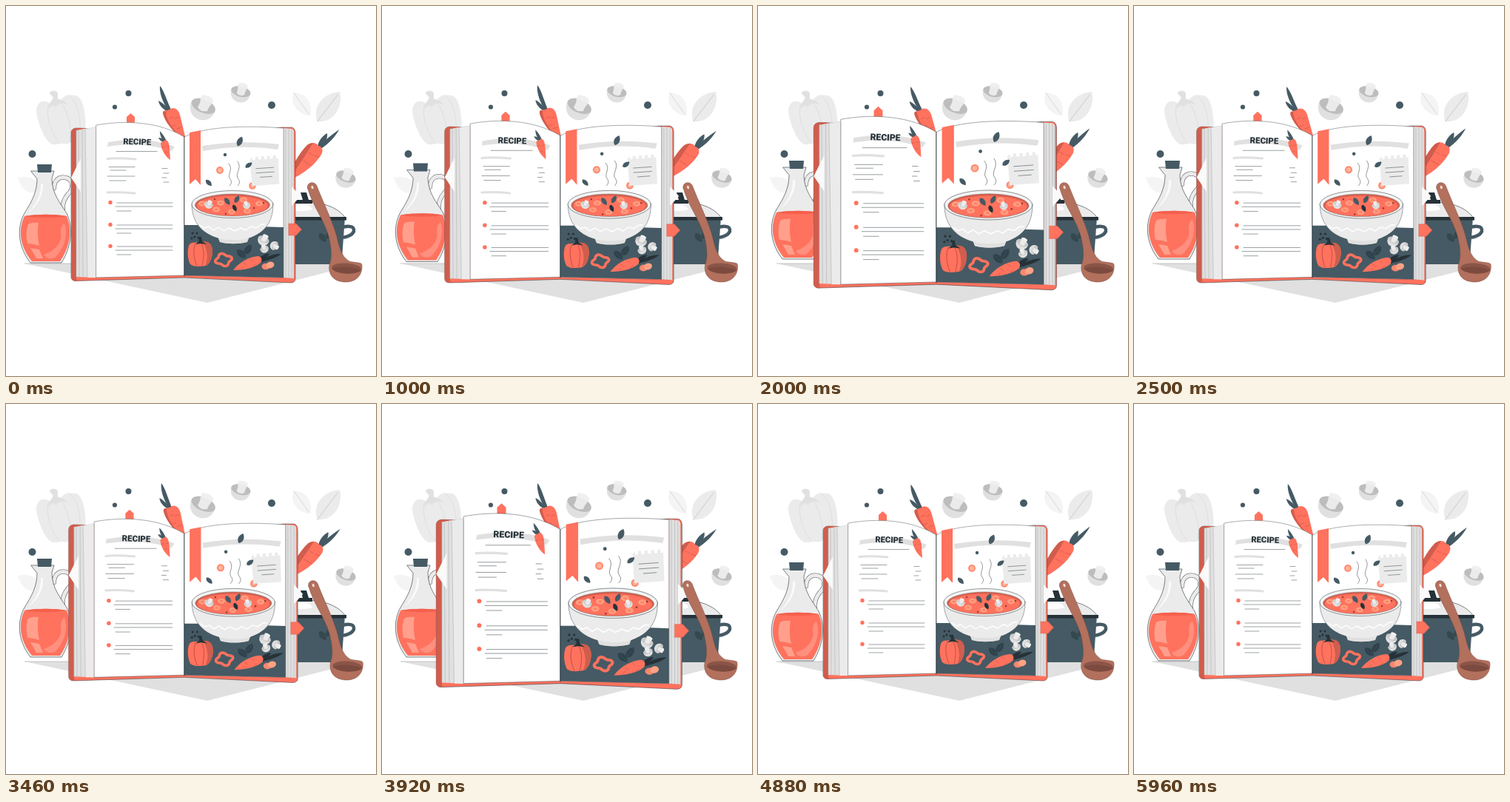
An HTML page with a canvas that plays this animation: 500 by 500 pixels, repeating every 6 s.

```html
<!DOCTYPE html>
<html lang="en">
<head>
<meta charset="utf-8">
<title>Recipe book</title>
<style>
html, body { margin: 0; width: 100%; height: 100%; overflow: hidden; background: #fff; }
canvas { display: block; width: 100vw; height: 100vh; }
</style>
</head>
<body>
<canvas id="stage"></canvas>
<script>
const LOOP = 6000, TAU = Math.PI * 2;
const CORAL = '#ff725e', RUST = '#d05d4d', PEACH = '#ff9f8c', SLATE = '#455a64', INK = '#263238';
const G1 = '#f4f4f4', G2 = '#ebebeb', G3 = '#e0e0e0', G4 = '#bdbdbd';
const canvas = document.getElementById('stage');
const ctx = canvas.getContext('2d');

// [time, value] pairs, eased by a half cosine between neighbours
const SCALE = [[0, 1], [700, 1], [1690, 1.099], [2860, 1], [3220, 1], [4010, 1.099], [4730, 1], [6000, 1]];
const SWAY = [[0, 0], [600, 0], [1500, -1], [2500, 1.3], [3460, 1.3], [3960, -1], [4800, 0], [6000, 0]];
const LIFT = [[0, 0], [500, 0], [1900, -5], [3900, -5], [4800, 0], [6000, 0]];

function ease(keys, t) {
  let i = 1;
  while (i < keys.length - 1 && t > keys[i][0]) i++;
  const [t0, a] = keys[i - 1], [t1, b] = keys[i];
  return a + (b - a) * (1 - Math.cos(Math.PI * (t - t0) / (t1 - t0))) / 2;
}

const cache = {};
const path = d => cache[d] || (cache[d] = new Path2D(d));

function shape(d, fill, stroke, w = 0.5) {
  const p = path(d);
  if (fill) { ctx.fillStyle = fill; ctx.fill(p); }
  if (stroke) { ctx.strokeStyle = stroke; ctx.lineWidth = w; ctx.stroke(p); }
}
const line = (d, color = INK, w = 0.45) => shape(d, null, color, w);

function oval(x, y, rx, ry, fill, rot = 0, stroke) {
  ctx.beginPath();
  ctx.ellipse(x, y, rx, ry, rot, 0, TAU);
  if (fill) { ctx.fillStyle = fill; ctx.fill(); }
  if (stroke) { ctx.strokeStyle = stroke; ctx.lineWidth = 0.5; ctx.stroke(); }
}
const dot = (x, y, r, fill) => oval(x, y, r, r, fill);

function place(x, y, rot, s, draw) {
  ctx.save();
  ctx.translate(x, y);
  ctx.rotate(rot);
  ctx.scale(s, s);
  draw();
  ctx.restore();
}

function pivot(x, y, rot, draw) {
  place(x, y, rot, 1, () => { ctx.translate(-x, -y); draw(); });
}

// a pointed leaf of length 20 along x, centred
function leaf(x, y, rot, s, fill, vein) {
  place(x, y, rot, s, () => {
    shape('M-10 0C-6 -7 4 -7 10 0C4 7 -6 7 -10 0Z', fill);
    if (vein) line('M-10 0L8 0', vein, 0.6);
  });
}

// dome below, dark gills facing up, stem rising from them
function mushroom(x, y, rot, s, dark = G4) {
  place(x, y, rot, s, () => {
    shape('M-18 -3C-19 10 -10 18 0 18C11 18 19 10 18 -3Z', G3);
    oval(0, -2, 18, 9.5, dark);
    shape('M-7 2C-5 -4 -8 -9 -8 -14C-6 -19 8 -19 10 -14C10 -9 7 -4 8 2C4 6 -4 6 -7 2Z', G2);
    oval(1, -14, 9, 3.6, '#f0f0f0');
  });
}

function floor() {
  shape('M25 348L272 401L480 348Z', G3);
  line('M25 348H480', '#999', 0.5);
}

function greyPepper() {
  shape('M62 129C52 121 42 128 43 143C44 158 49 178 57 184C63 188 68 184 72 186C79 189 84 184 88 186C98 188 106 176 107 160C109 139 106 122 94 123C88 120 82 123 78 127C73 122 67 123 62 129Z', G2);
  line('M61 130C54 146 59 170 68 185M76 128C86 143 88 169 82 185M92 125C102 139 102 164 94 184', '#dedede', 0.9);
  shape('M60 138C61 129 67 128 68 122L64 116C67 112 73 113 75 117L74 126C80 127 84 130 86 135C79 130 74 131 70 136C68 131 64 132 60 138Z', G3);
}

function bottle() {
  line('M65 246C65 235 72 230 81 232C92 235 91 248 84 254C79 260 76 266 77 274', '#555', 6);
  line('M65 246C65 235 72 230 81 232C92 235 91 248 84 254C79 260 76 266 77 274', G2, 5);
  shape('M34 223H65L62 233C62 253 73 266 82 280C90 297 90 323 75 347H33C15 324 15 298 25 280C35 264 42 251 42 234Z', G2, INK, 0.6);
  shape('M25 284C17 301 17 323 35 345H73C88 323 89 301 82 284C65 281 43 281 25 284Z', CORAL);
  shape('M25 284C43 281 65 281 82 284C65 287 43 287 25 284Z', '#f4604d');
  shape('M30 295C35 292 41 293 44 293C42 304 43 314 45 324C39 322 33 321 29 321C27 311 27 303 30 295Z', PEACH);
  shape('M33 327L45 329L50 341L41 341Z', PEACH);
  shape('M79 294C84 306 80 327 66 340C59 343 53 340 51 336C66 331 77 319 74 306C74 299 76 295 79 294Z', '#ff8f7e');
  shape('M47 240C48 258 37 271 31 279C44 268 51 255 50 240Z', '#fafafa');
  shape('M42 214H62L61 225H43Z', SLATE);
}

function leftCarrot() {
  shape('M220 142C212 131 207 118 208 108C213 113 217 127 223 140Z', SLATE);
  shape('M219 143C211 139 207 134 206 128C211 130 217 136 222 142Z', SLATE);
  shape('M212 145C213 140 219 142 222 139C228 136 233 140 235 147L244 184C231 175 216 160 212 145Z', CORAL);
  shape('M212 145C212 142 214 141 216 142C216 154 226 169 244 184C231 175 216 160 212 145Z', RUST);
  line('M221 152L226 150M223 163L229 161M233 150L228 152M237 164L231 166', RUST, 0.8);
}

function rightCarrot() {
  shape('M421 192C421 183 428 175 434 172C435 179 431 187 424 193Z', SLATE);
  shape('M421 192C430 182 440 174 450 167C446 175 437 186 424 194Z', SLATE);
  shape('M407 188C413 183 420 185 422 189C428 190 429 196 426 201C417 215 404 226 380 237C386 217 396 199 407 188Z', CORAL);
  shape('M407 188C410 186 413 185 415 185C407 198 393 220 380 237C386 217 396 199 407 188Z', RUST);
  line('M409 198L414 201M402 209L407 212M423 204L417 202M412 215L407 212', RUST, 0.8);
}

function pot() {
  line('M451 301C457 297 469 296 470 302C471 308 462 313 451 313', SLATE, 4.5);
  shape('M340 286H458L454 341C453 347 449 349 444 349H340Z', SLATE);
  leaf(428, 313, 0.9, 0.75, '#344850');
  leaf(437, 308, -1, 0.75, '#344850');
  shape('M340 286C350 267 384 263 411 265C437 267 452 276 459 287Z', G2, INK, 0.6);
  shape('M391 270C404 266 412 269 414 275C406 278 396 277 390 277Z', '#fff');
  shape('M340 285H460V289.500H340Z', INK);
  shape('M398 252H406L409 262H414V267H391V262H401Z', INK);
}

function ladle() {
  shape('M407.500 246C406 238 417 236 420 243C428 264 440 288 446 308C450 323 452 338 464 345C471 347 481 346 481 350C482 365 472 373 459 373C444 373 435 364 437 350C441 340 440 327 436 311C430 289 414 270 407.500 246Z', '#b2705d', '#7b493e', 0.5);
  oval(460, 354.500, 20, 7, '#8a5548', 0.06);
  shape('M440 355C452 350 470 353 480 357C474 363 449 364 440 355Z', '#7d4a3f');
  oval(414, 245, 1.5, 2.4, '#f5dfd6', -0.3);
}

function cover() {
  shape('M163 162V150L168.500 145L174 150V162Z', CORAL);
  shape('M88 172C88 167 91 165 96 165L122 166L241 180L372 164H385C389 164 391 167 391 172V368C391 372 389 374 384 374L241 367L96 371.500C91 372 88 370 88 366Z', CORAL, INK, 0.5);
  shape('M88 172C88 167 91 165 96 165H106L95 170V368L96 371.500C91 372 88 370 88 366Z', RUST);
}

function pageEdges() {
  shape('M95 168L122 163V367L95 366Z', G3);
  shape('M107 167L122 164V367L110 367Z', G2);
  line('M95 168V366M98 168L99 366M103 167L104 366M107 167L110 367', '#b4b4b4', 0.6);
  shape('M375 165L386 166C389 167 389 169 389 172V368L375 367Z', G3);
  line('M378 166V367M382 166V367M386 167V368M389 172V368', '#b4b4b4', 0.6);
  shape('M101 206V251L88 232Z', '#fafafa');
  shape('M386 244L398 257L386 270Z', '#fafafa');
  shape('M382 294H392L399.500 302L392 310H382Z', CORAL, RUST, 0.4);
}

function pageCarrot() {
  shape('M214 184C210 179 208 175 208 169C212 173 215 178 217 183Z', SLATE);
  shape('M213 184C209 183 207 180 206 178C210 178 213 180 215 183Z', SLATE);
  shape('M209 186C210 182 213 184 215 181C219 181 220 185 221 191L222 208C216 204 210 195 209 186Z', CORAL);
  line('M211 191L214 190M215 198L218 197M220 189L217 190', RUST, 0.7);
}

function leftPage() {
  shape('M122 161C160 154 207 156 241 177V364L122 367Z', '#fff', INK, 0.4);
  shape('M138 184C170 178 202 180 228 190L224 196C198 187 167 185 137 190Z', G3);
  place(177.200, 187.300, 0.035, 1, () => {
    ctx.font = '900 11.2px Roboto, "Liberation Sans", sans-serif';
    ctx.textAlign = 'center';
    ctx.fillStyle = INK;
    ctx.fillText('RECIPE', 0, 0);
  });
  line('M149 196.500H204');
  line('M137 206.500C150 205 163 206 175 207', G3, 3);
  line('M137 252C150 251 163 252 174 253', G3, 3);
  line('M139 217.500H174M141 222H162M137 230H174M140 236H162');
  line('M211 219.500H218M213 226H220M211 232H217M213 238H220');
  for (const y of [266, 296, 325]) {
    dot(141, y - 0.5, 2.7, CORAL);
    line(`M150 ${y}H225M148 ${y + 5}H225M150 ${y + 11}H169`);
  }
  pageCarrot();
}

function note() {
  place(349, 223, -0.07, 1, () => {
    shape('M-18 -17L-15 -20V-16H-11V-20H-7V-16H-3V-20H1V-16H5V-20H9V-16H13V-20H17V-16H20L19 19H-18Z', G2);
    line('M-11 -4H13M-11 2H13M-6 8H10');
  });
}

function bowl() {
  shape('M251 267C251 291 263 307 287 314L289 319C299 322 315 322 326 319L328 314C351 306 361 291 361 267Z', G2, INK, 0.4);
  shape('M287 314C300 317 316 317 328 314L326 319C315 322 299 322 289 319Z', G3);
  line('M262 296L268 300L274 298L280 303L287 299L294 304L301 300L309 304L317 300L324 303L331 298L338 300L345 295L350 295', '#fff', 1.4);
  oval(306, 268, 55, 18.500, G1, 0, INK);
  oval(306, 269, 50.500, 15, '#d95f4d', 0, '#777');
  oval(306, 270, 48, 13.500, CORAL);
  const slices = [[265, 267], [284, 275], [290, 266], [305, 278], [321, 262], [326, 277], [342, 267]];
  for (const [x, y] of slices) {
    oval(x, y, 5, 3.4, '#ffa184');
    oval(x, y, 2.6, 1.6, '#ff8467');
  }
  for (const [x, y] of [[282, 261], [297, 281], [335, 273], [348, 266]]) dot(x, y, 1.3, '#9d3c34');
  mushroom(274, 268, 0.4, 0.32, '#cfcfcf');
  mushroom(325, 269, -0.4, 0.28, '#cfcfcf');
  leaf(299, 264, 0.95, 0.58, SLATE);
  leaf(312, 261, -1.05, 0.56, SLATE);
  leaf(309, 273, 1.15, 0.5, INK);
}

// a four-lobed slice
function pepperRing(x, y) {
  ctx.beginPath();
  for (let a = 0; a <= TAU; a += 0.1) {
    const r = 1 + 0.17 * Math.cos(4 * a + 1.2);
    ctx.lineTo(x + 10 * r * Math.cos(a), y + 7.5 * r * Math.sin(a));
  }
  ctx.closePath();
  ctx.strokeStyle = CORAL;
  ctx.lineWidth = 3.6;
  ctx.stroke();
}

function table() {
  shape('M241 296C287 296 330 298 375 299V367L241 364Z', SLATE);
  for (const [x, y] of [[252, 307], [258, 307], [255, 312], [260, 313], [251, 314]]) dot(x, y, 1.5, INK);
  shape('M247 324C250 317 259 321 264 319C272 317 279 322 279 331C279 341 275 349 270 351C260 353 252 352 249 349C245 341 245 331 247 324Z', CORAL);
  shape('M266 319C274 317 279 322 279 331C279 341 275 349 269 351C274 342 272 328 266 319Z', RUST);
  line('M256 321C252 330 254 342 258 351M264 321C269 331 267 343 265 351', '#b9483a', 0.8);
  shape('M256 322L261 318L260 312L264 312L265 318L271 322L263 321Z', INK);
  pepperRing(294, 343);
  leaf(318, 335, 0.75, 0.8, '#2f424b', SLATE);
  leaf(327, 329, -0.95, 0.8, '#2f424b', SLATE);
  shape('M342 343C350 341 360 334 372 335C366 340 353 344 344 346Z', INK);
  shape('M342 342C346 336 352 334 356 335C353 339 348 343 343 345Z', INK);
  shape('M307 357C315 346 329 339 340 338C345 338 347 343 344 347C336 354 321 357 307 357Z', CORAL);
  line('M321 347L325 350M330 342L333 345M334 352L337 349M318 355L321 352', RUST, 0.8);
  oval(351, 352, 5.5, 4.3, '#f5886f');
  oval(357, 350, 5.5, 4.3, '#ffa184', -0.25);
  mushroom(348, 316, 0.45, 0.43, '#c9c9c9');
  mushroom(363, 324, 2.1, 0.34, '#c9c9c9');
  mushroom(349, 328, -0.4, 0.32, '#c9c9c9');
}

function rightPage() {
  shape('M241 177C265 163 322 161 375 165V367L241 364Z', '#fff', INK, 0.4);
  shape('M265 189C301 183 336 183 369 187L367 194C332 189 299 190 266 196Z', G3);
  table();
  line('M241 177V365', INK, 0.6);
  shape('M248 171L263 168V242L256 234L248 241Z', CORAL);
  dot(333, 243, 4.8, '#ff8b70');
  dot(333, 243, 2.6, '#ffb49d');
  note();
  leaf(316, 183, -1.15, 0.7, SLATE);
  leaf(328, 215, -0.65, 0.56, SLATE);
  leaf(274, 239, 0.8, 0.55, SLATE);
  dot(296, 201, 2.2, SLATE);
  dot(289, 222, 5, '#ff8b70');
  dot(289, 222, 3, '#ffb49d');
  line('M301 213C308 221 298 228 303 234C306 238 304 241 302 243M313 210C320 219 308 227 314 234C317 238 315 241 313 243', '#555', 0.6);
  bowl();
}

function draw(t) {
  ctx.fillStyle = '#fff';
  ctx.fillRect(0, 0, 500, 500);
  ctx.lineJoin = ctx.lineCap = 'round';
  const tilt = 0.035 * Math.sin(TAU * t / 3000);

  floor();
  pivot(75, 155, -0.14, greyPepper);
  shape('M16 233C25 228 39 231 46 243C47 251 41 253 33 252C25 251 20 243 16 233Z', G1);
  place(0, ease(LIFT, t), 0, 1, bottle);
  pot();
  mushroom(266, 137, 0.4, 0.95);
  mushroom(317, 117, 0.25, 0.74);
  mushroom(459, 232, 0.35, 0.76);
  leaf(400, 133, 0.95, 1.9, G1, G3);
  leaf(436, 136, -0.92, 2.5, G2, '#d8d8d8');
  dot(165.500, 118, 4, SLATE);
  dot(147, 136.500, 3.1, SLATE);
  dot(359, 134, 5, SLATE);
  dot(35.500, 200, 5, SLATE);
  pivot(240, 172, tilt, leftCarrot);
  pivot(392, 226, tilt, rightCarrot);

  place(241, 256, 0, ease(SCALE, t), () => {
    ctx.translate(-241, -256);
    cover();
    pageEdges();
    leftPage();
    rightPage();
  });

  place(ease(SWAY, t), 0, 0, 1, ladle);
}

function frame() {
  const k = window.devicePixelRatio || 1;
  const w = Math.round(innerWidth * k), h = Math.round(innerHeight * k);
  if (canvas.width !== w || canvas.height !== h) {
    canvas.width = w;
    canvas.height = h;
  }
  ctx.setTransform(w / 500, 0, 0, h / 500, 0, 0);
  draw(performance.now() % LOOP);
  requestAnimationFrame(frame);
}
frame();
</script>
</body>
</html>
```
